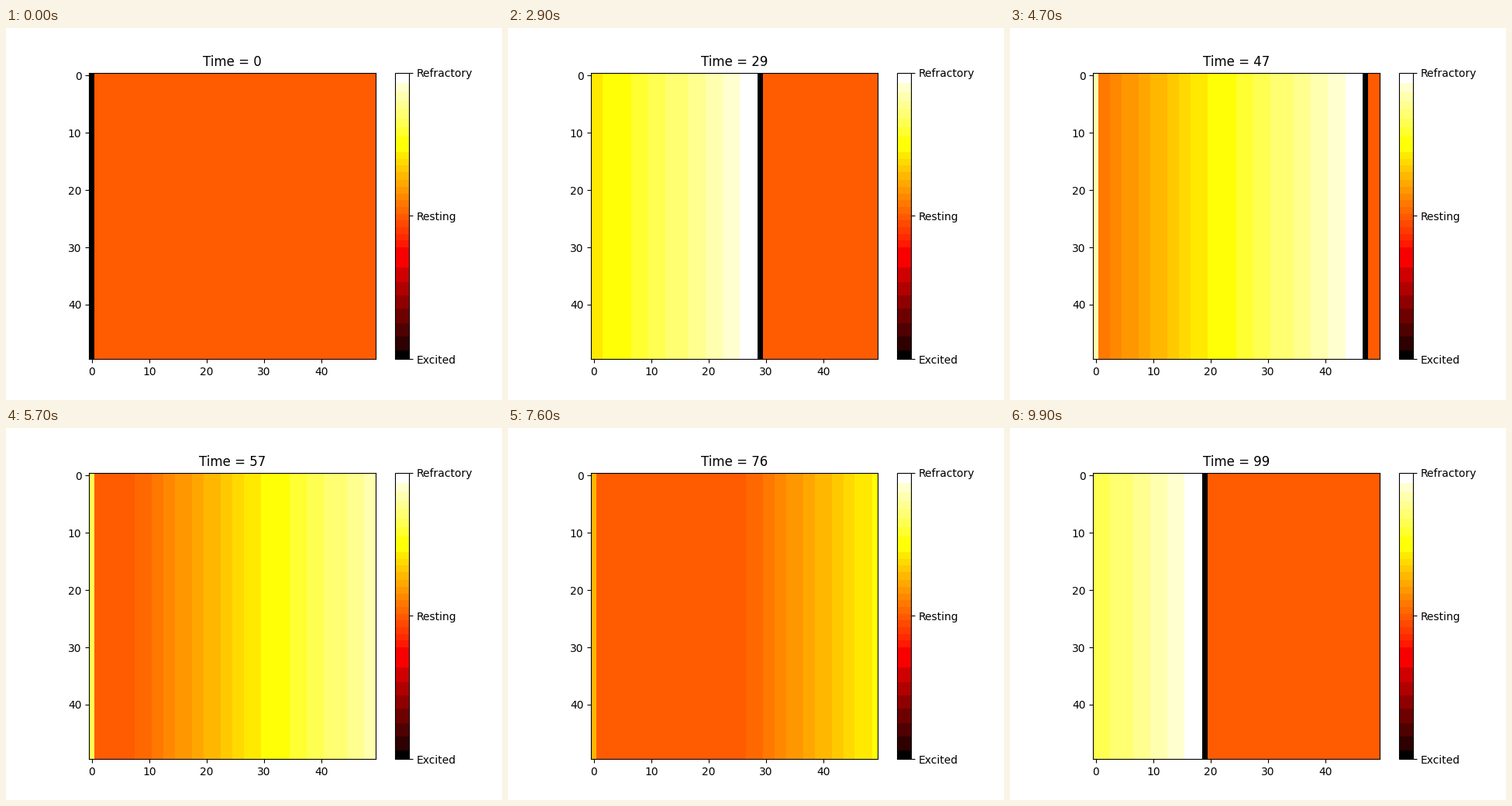
A matplotlib script for the animation above (10 s loop, 640x480 px).

```python
import numpy as np
import matplotlib.pyplot as plt
from matplotlib.animation import FuncAnimation
from matplotlib.colors import ListedColormap

SIZE = 50
PEAK = 50      # refractory steps after firing
PERIOD = 40    # pacing of the left edge
STEPS = 100


def banded_hot():
    """The "hot" map in flat bands: wide at both ends, narrow in the middle."""
    dark = np.linspace(8, 82, 7)
    middle = np.arange(100, 186, 6.1)
    light = np.linspace(199, 256, 8)
    edges = np.concatenate([dark, middle, light]).astype(int)

    hot = plt.get_cmap("hot")
    lut = np.ones((256, 4))
    lut[:edges[0], :3] = 0
    for lo, hi in zip(edges[:-2], edges[1:-1]):
        lut[lo:hi] = hot((lo + hi) // 2)
    lut[128] = hot(128)
    return ListedColormap(lut)


def tissue(t):
    """Cell states: -PEAK excited, 0 resting, above 0 refractory."""
    row = np.zeros(SIZE)
    cols = np.arange(SIZE)
    for start in range(0, STEPS, PERIOD):
        age = t - start - cols
        # Every second pulse is blocked by refractory neighbours
        reach = (cols == 0) | (start % (2 * PERIOD) == 0)
        live = reach & (age >= 0) & (age < PEAK)
        row[live] = np.where(age == 0, -PEAK, PEAK - age)[live]
    return np.tile(row, (SIZE, 1))


fig, ax = plt.subplots(figsize=(6.4, 4.8), dpi=100)
image = ax.imshow(tissue(0), cmap=banded_hot(), vmin=-PEAK, vmax=PEAK,
                  interpolation="nearest")
bar = fig.colorbar(image, ax=ax, ticks=[-PEAK, 0, PEAK])
bar.ax.set_yticklabels(["Excited", "Resting", "Refractory"])
title = ax.set_title("Time = 0")


def update(t):
    image.set_data(tissue(t))
    title.set_text(f"Time = {t}")
    return image, title


anim = FuncAnimation(fig, update, frames=STEPS, interval=100, repeat=True,
                     repeat_delay=0, blit=False)
plt.show()
```
